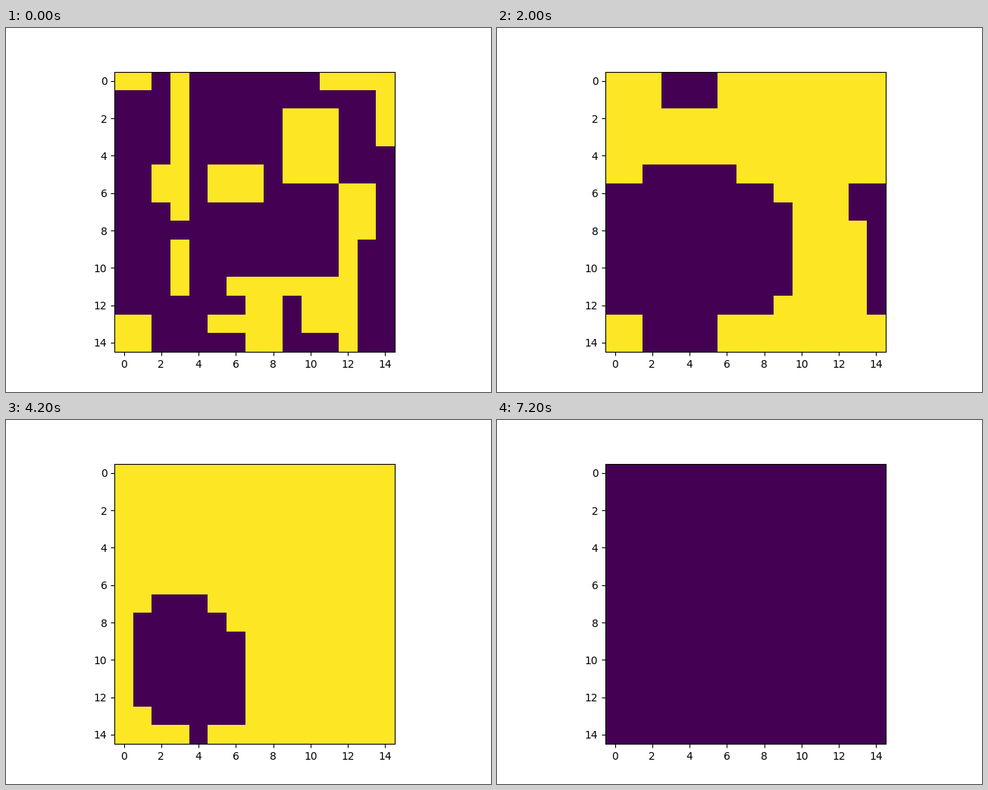
A matplotlib script for the animation above (8000 ms loop, 640x480 px).

```python
import numpy as np
import matplotlib.pyplot as plt
from matplotlib.animation import FuncAnimation

N = 15
STEPS = 40
INTERVAL = 200
SETTLED, END = 7, 36
rng = np.random.default_rng(4)
rows, cols = np.mgrid[:N, :N]

# Main light streaks of the starting grid: (col, row, width, height).
STREAKS = [
    (0, 0, 2, 1), (3, 0, 1, 8), (11, 0, 4, 1), (14, 0, 1, 4), (9, 2, 3, 4),
    (2, 5, 2, 2), (5, 5, 3, 2), (12, 6, 2, 3), (12, 9, 1, 6), (3, 9, 1, 3),
    (6, 11, 6, 1), (10, 12, 2, 2), (5, 13, 4, 1), (7, 12, 2, 3), (0, 13, 2, 2),
]

# Paths of the shrinking dark blobs: (step, x, y, x radius, y radius, tilt).
BODY = [
    (7, 4, 8.6, 5.6, 3.4, 0),
    (14, 3.55, 9.3, 5.1, 4.7, 0),
    (18, 3.2, 10, 3.7, 4.1, 0.1),
    (25, 3.5, 10.9, 2.7, 3.15, 0.25),
    (30, 3.7, 11.6, 1.9, 0.9, 0.8),
    (32, 4, 12, 0.45, 0.45, 0),
]
STEM = [
    (7, 4, 14.5, 2, 3, 0.2),
    (14, 3.7, 14.6, 1.7, 1.6, 0),
    (18, 4.5, 13.6, 0.9, 0.9, 0),
    (22, 4.5, 13.6, 0.1, 0.1, 0),
]
PATCH = [
    (7, 13.9, 5.9, 2.3, 1.4, 0),
    (14, 14, 8, 0.7, 0.7, 0),
    (18, 14, 8, 0.7, 0.7, 0),
    (20, 14.5, 8, 0.1, 0.1, 0),
]


def wrap(d):
    """Shortest signed distance on the periodic grid."""
    return (d + N / 2) % N - N / 2


def inside(path, step):
    times, *tracks = zip(*path)
    x, y, rx, ry, tilt = (np.interp(step, times, t) for t in tracks)
    # Square corners round off to an ellipse.
    power = np.interp(step, (7, 14), (6, 2))
    dy = wrap(rows - y)
    dx = wrap(cols - x - tilt * dy)
    return abs(dx / rx) ** power + abs(dy / ry) ** power < 1


def domain_grid(step):
    dark = inside(BODY, step) | inside(STEM, step) | inside(PATCH, step)
    return 1 - dark.astype(int)


def start_grid():
    grid = np.zeros((N, N), int)
    for c, r, w, h in STREAKS:
        grid[r:r + h, c:c + w] = 1
    return grid


def light_neighbours(grid):
    return sum(np.roll(grid, d, axis) for d in (1, -1) for axis in (0, 1))


def coarsen(grid, goal, steps, power=1.8):
    """Flip the spins that have the most neighbours on the goal's side first."""
    grid = grid.copy()
    total = np.sum(grid != goal)
    for i in range(steps):
        left = round(total * (1 - i / steps) ** power)
        while np.sum(grid != goal) > left:
            light = light_neighbours(grid)
            support = np.where(goal == 1, light, 4 - light) + rng.random((N, N))
            support[grid == goal] = -1
            spot = np.unravel_index(np.argmax(support), grid.shape)
            grid[spot] = goal[spot]
        yield grid.copy()


states = list(coarsen(start_grid(), domain_grid(SETTLED), SETTLED))
states += [domain_grid(step) for step in range(SETTLED, END)]
# A uniform grid maps to the bottom of the colour scale.
states += [np.zeros((N, N), int)] * (STEPS - END)

fig, ax = plt.subplots(figsize=(6.4, 4.8), dpi=100)
image = ax.imshow(states[0], vmin=0, vmax=1, cmap="viridis")


def update(step):
    image.set_data(states[step])
    return [image]


anim = FuncAnimation(fig, update, frames=STEPS, interval=INTERVAL, repeat=True)
plt.show()
```
